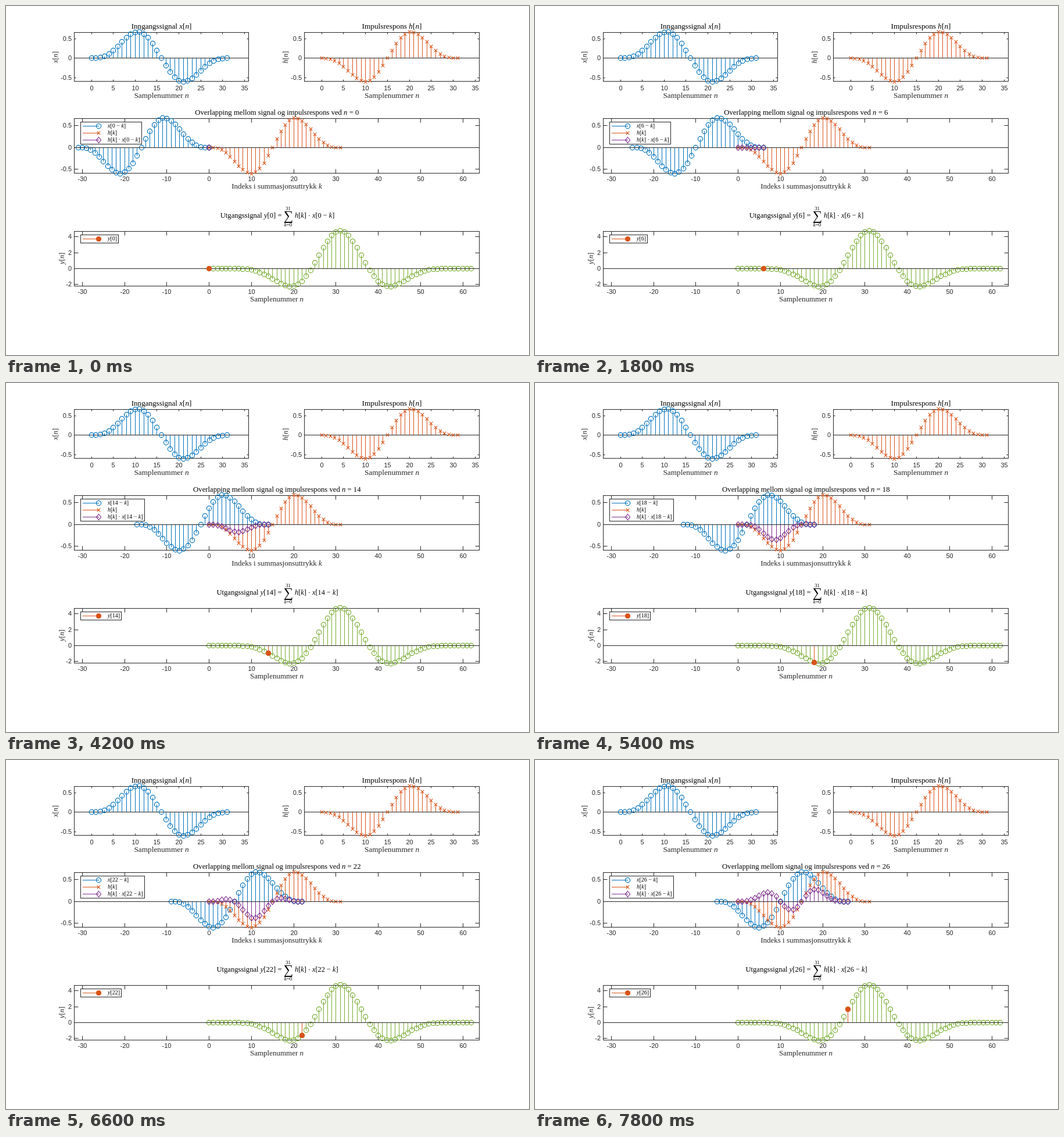
Write an HTML page with a canvas that moves like this. It is 900 by 600 pixels and loops after 8000 ms.

```html
<!DOCTYPE html>
<html lang="no">
<head>
<meta charset="utf-8">
<title>Konvolusjon</title>
<style>
html, body { margin: 0; width: 100%; height: 100%; overflow: hidden; background: #fff; }
canvas { display: block; }
</style>
</head>
<body>
<canvas id="stage" width="900" height="600"></canvas>
<script>
const ctx = document.getElementById('stage').getContext('2d');
const BLUE = '#0072bd', ORANGE = '#d95319', PURPLE = '#7e2f8e', GREEN = '#77ac30';
const INK = '#262626', BLACK = '#000';
const N = 32, STEP = 300, LOOP = 8000;

// Hann-windowed sine, its time reversal and their convolution
const range = (a, b, step = 1) => Array.from({ length: Math.floor((b - a) / step) + 1 }, (_, i) => a + i * step);
const x = range(0, N - 1).map(n => Math.sin(2 * Math.PI * n / N) * Math.sin(Math.PI * n / (N - 1)) ** 2);
const h = [...x].reverse();
const product = (n, k) => h[k] * (x[n - k] || 0);
const y = range(0, 2 * N - 2).map(n => h.reduce((sum, _, k) => sum + product(n, k), 0));

const crisp = v => Math.floor(v) + 0.5;

function line(x1, y1, x2, y2, color) {
  ctx.strokeStyle = color;
  ctx.beginPath();
  ctx.moveTo(x1, y1);
  ctx.lineTo(x2, y2);
  ctx.stroke();
}

const markers = {
  circle(px, py) { ctx.arc(px, py, 4.1, 0, 2 * Math.PI); },
  dot(px, py) { ctx.arc(px, py, 4, 0, 2 * Math.PI); ctx.fill(); },
  cross(px, py) {
    const r = 2.8;
    ctx.moveTo(px - r, py - r); ctx.lineTo(px + r, py + r);
    ctx.moveTo(px - r, py + r); ctx.lineTo(px + r, py - r);
  },
  diamond(px, py) {
    ctx.moveTo(px, py - 5); ctx.lineTo(px + 4, py);
    ctx.lineTo(px, py + 5); ctx.lineTo(px - 4, py);
    ctx.closePath();
  }
};

function mark(type, px, py, color) {
  ctx.strokeStyle = ctx.fillStyle = color;
  ctx.lineWidth = 1.2;
  ctx.beginPath();
  markers[type](crisp(px), crisp(py));
  ctx.stroke();
  ctx.lineWidth = 1;
}

// Serif text; parts between asterisks are italic
function label(str, px, py, size, align = 0.5, color = INK) {
  const parts = str.split('*').map((s, i) => {
    const font = `${i % 2 ? 'italic ' : ''}${size}px "Liberation Serif", serif`;
    ctx.font = font;
    return { s, font, w: ctx.measureText(s).width };
  });
  let left = px - align * parts.reduce((sum, p) => sum + p.w, 0);
  ctx.fillStyle = color;
  ctx.textAlign = 'left';
  for (const p of parts) {
    ctx.font = p.font;
    ctx.fillText(p.s, left, py);
    left += p.w;
  }
}

function sideLabel(str, px, py) {
  ctx.save();
  ctx.translate(px, py);
  ctx.rotate(-Math.PI / 2);
  label(str, 0, 0, 12.5);
  ctx.restore();
}

function plot(left, top, right, bottom, xlim, data, xticks, yticks) {
  const lo = Math.min(...data), hi = Math.max(...data);
  const pad = 0.6; // the data area reaches the outer edge of the frame line
  const scale = (v, a, b, from, to) => from + (v - a) / (b - a) * (to - from);
  const X = v => scale(v, ...xlim, left - pad, right + pad);
  const Y = v => scale(v, lo, hi, bottom + pad, top - pad);
  return {
    axes(name, nameY, size) {
      const tick = (right - left) * 0.01;
      ctx.strokeStyle = INK;
      ctx.strokeRect(left, top, right - left, bottom - top);
      ctx.font = '11px "Liberation Sans", Arial, sans-serif';
      ctx.fillStyle = INK;
      ctx.textAlign = 'center';
      for (const v of xticks) {
        const px = crisp(X(v));
        line(px, bottom, px, bottom - tick, INK);
        line(px, top, px, top + tick, INK);
        ctx.fillText(v, px, nameY - 13);
      }
      ctx.textAlign = 'right';
      for (const v of yticks) {
        const py = crisp(Y(v));
        line(left, py, left + tick, py, INK);
        line(right, py, right - tick, py, INK);
        ctx.fillText(v, left - 4.5, py + 3.5);
      }
      label(name, (left + right) / 2, nameY, size);
    },
    stems(ks, value, type, color) {
      const zero = crisp(Y(0));
      for (const k of ks) line(crisp(X(k)), zero, crisp(X(k)), Y(value(k)), color);
      line(left, zero, right, zero, INK);
      for (const k of ks) mark(type, X(k), Y(value(k)), color);
    }
  };
}

function legend(top, width, height, rows) {
  ctx.fillStyle = '#fff';
  ctx.fillRect(128.5, top, width, height);
  ctx.strokeStyle = INK;
  ctx.strokeRect(128.5, top, width, height);
  rows.forEach(([str, type, color], i) => {
    const py = crisp(top + 7 + i * 11.8);
    line(132, py, 160, py, color);
    mark(type, 159.5, py, color);
    label(str, 175, py + 2.5, 10, 0, BLACK);
  });
}

const small = range(0, 35, 5), wide = range(-30, 60, 10), half = [-0.5, 0, 0.5];
const input = plot(117.5, 45.5, 417.5, 129.5, [-4, 36], x, small, half);
const impulse = plot(513.5, 45.5, 814.5, 129.5, [-4, 36], h, small, half);
const overlap = plot(117.5, 193.5, 814.5, 287.5, [-32, 64], x, wide, half);
const output = plot(117.5, 387.5, 814.5, 481.5, [-32, 64], y, wide, [-2, 0, 2, 4]);
const samples = range(0, N - 1);

function draw(n) {
  const extra = n > 9 ? 5 : 0;
  const shifted = `*x*[${n} − *k*]`;
  ctx.fillStyle = '#fff';
  ctx.fillRect(0, 0, 900, 600);
  ctx.lineWidth = 1;

  input.axes('Samplenummer *n*', 158, 13.3);
  input.stems(samples, k => x[k], 'circle', BLUE);
  label('Inngangssignal *x*[*n*]', 267.5, 39, 13.1, 0.5, BLACK);
  sideLabel('*x*[*n*]', 89, 88);

  impulse.axes('Samplenummer *n*', 158, 13.3);
  impulse.stems(samples, k => h[k], 'cross', ORANGE);
  label('Impulsrespons *h*[*n*]', 664, 39, 13.3, 0.5, BLACK);
  sideLabel('*h*[*n*]', 485, 88);

  overlap.axes('Indeks i summasjonsuttrykk *k*', 314, 13);
  overlap.stems(range(n - N + 1, n), k => x[n - k], 'circle', BLUE);
  overlap.stems(samples, k => h[k], 'cross', ORANGE);
  overlap.stems(range(0, n), k => product(n, k), 'diamond', PURPLE);
  label(`Overlapping mellom signal og impulsrespons ved *n* = ${n}`, 466.3, 187, 12.7, 0.5, BLACK);
  legend(199.5, 105 + extra, 38, [
    [shifted, 'circle', BLUE],
    ['*h*[*k*]', 'cross', ORANGE],
    [`*h*[*k*] · ${shifted}`, 'diamond', PURPLE]
  ]);

  output.axes('Samplenummer *n*', 508, 13);
  output.stems(range(0, y.length - 1), k => y[k], 'circle', GREEN);
  output.stems([n], k => y[k], 'dot', ORANGE);
  label(`Utgangssignal *y*[${n}] =`, 474.5, 364, 12.6, 1, BLACK);
  label('∑', 486, 367.5, 23, 0.5, BLACK);
  label('31', 485.5, 351, 8.7, 0.5, BLACK);
  label('*k*=0', 485.5, 379, 9, 0.5, BLACK);
  label(`*h*[*k*] · ${shifted}`, 497, 364, 12.3, 0, BLACK);
  sideLabel('*y*[*n*]', 100, 434);
  legend(393.5, 65 + extra, 14, [[`*y*[${n}]`, 'dot', ORANGE]]);
}

function frame() {
  draw(Math.floor(performance.now() % LOOP / STEP));
  requestAnimationFrame(frame);
}
frame();
</script>
</body>
</html>
```
